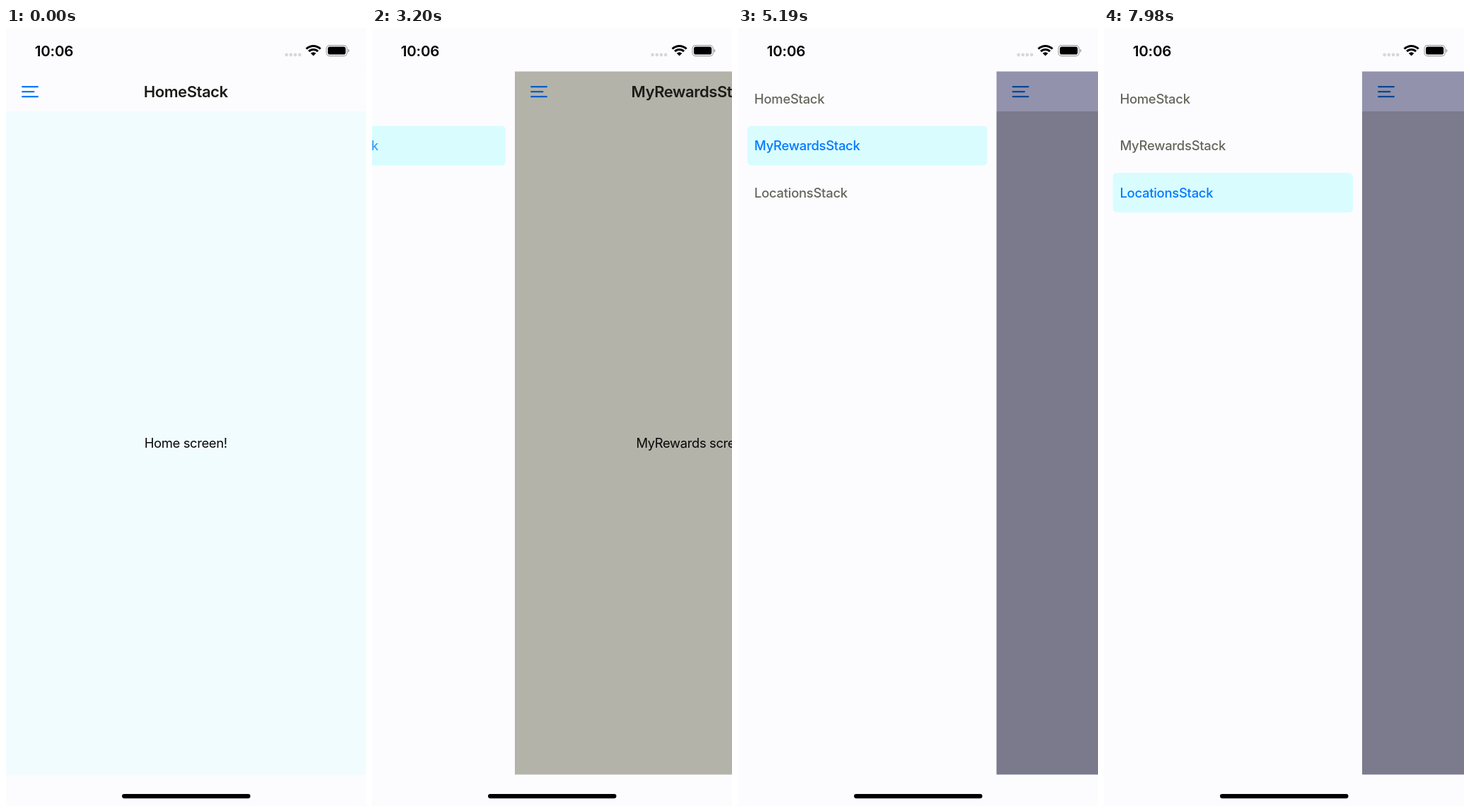
An HTML page with a canvas for the animation above (8 s loop, 509 px wide and 1101 px high).

```html
<!DOCTYPE html>
<html lang="en">
<head>
<meta charset="utf-8">
<title>Drawer navigation</title>
<style>
  html, body { margin: 0; width: 100%; height: 100%; overflow: hidden; background: #fcfcff; }
  canvas { display: block; }
</style>
</head>
<body>
<canvas id="stage" width="509" height="1101"></canvas>
<script>
const ctx = document.getElementById('stage').getContext('2d');
const LOOP = 8000, WIDTH = 509, DRAWER = 365.5;
const TOP = 61.5, HEADER_END = 118, BOTTOM = 1056.5;
const WHITE = '#fcfcff', BLUE = [0, 122, 255];
const ROUTES = ['Home', 'MyRewards', 'Locations'];

// Each move: press down, release, spring start, and whether the drawer ends open.
const MOVES = [
  { down: 1570, up: 1700, start: 1711, open: 1 },
  { down: 2790, up: 3090, start: 3118, open: 0, route: 1 },
  { down: 4275, up: 4420, start: 4432, open: 1 },
  { down: 5660, up: 5940, start: 5979, open: 0, route: 2 },
  { down: 7370, up: 7490, start: 7500, open: 1 },
];

// Shades of the dimmed screen by drawer progress.
const HEADER_SHADES = [[0, 252, 252, 255], [.077, 252, 252, 255], [.554, 179, 179, 170], [.94, 147, 146, 172], [1, 146, 146, 172]];
const BODY_SHADES = [[0, 243, 243, 254], [.077, 229, 229, 252], [.554, 179, 179, 170], [.94, 146, 145, 168], [1, 122, 122, 140]];

const rgb = c => `rgb(${c.map(Math.round).join()})`;

function shade(stops, p) {
  const i = Math.max(1, stops.findIndex(s => s[0] >= p));
  const [a, b] = [stops[i - 1], stops[i]];
  const k = (p - a[0]) / (b[0] - a[0]);
  return rgb([1, 2, 3].map(n => a[n] + (b[n] - a[n]) * k));
}

// Critically damped spring: stiffness 1000, mass 3.
function spring(ms) {
  const u = Math.sqrt(1000 / 3) / 1000 * Math.max(0, ms);
  return 1 - (1 + u) * Math.exp(-u);
}

function pressAlpha(t, { down, up }) {
  if (t < down) return 1;
  const k = Math.min(1, Math.max(0, (t - up) / 200));
  return .3 + .7 * (k < .5 ? 2 * k * k : 1 - 2 * (1 - k) ** 2);
}

function stateAt(t) {
  const state = { progress: 0, route: 0, buttonAlpha: 1, itemAlpha: [1, 1, 1] };
  for (const move of MOVES) {
    if (t < move.down) break;
    const alpha = pressAlpha(t, move);
    if (move.open) state.buttonAlpha = alpha;
    else state.itemAlpha[move.route] = alpha;
    if (!move.open && t >= move.up) state.route = move.route;
    if (t >= move.start) {
      const k = spring(t - move.start);
      state.progress = move.open ? k : 1 - k;
    }
  }
  return state;
}

function rect(x, y, w, h, color, r = 0) {
  ctx.fillStyle = color;
  ctx.beginPath();
  ctx.roundRect(x, y, w, h, r);
  ctx.fill();
}

function text(str, x, y, size, weight, color, spacing = 0, align = 'left') {
  ctx.font = `${weight} ${size}px Inter, sans-serif`;
  ctx.letterSpacing = spacing + 'px';
  ctx.textAlign = align;
  ctx.fillStyle = color;
  ctx.fillText(str, x, y);
}

function drawDrawer({ progress, route, itemAlpha }) {
  const x = (progress - 1) * DRAWER;
  ROUTES.forEach((name, i) => {
    const y = 72 + i * 66.5;
    if (i === route) rect(x + 13, y, 339.5, 56, '#d9fdff', 5.5);
    ctx.globalAlpha = itemAlpha[i];
    text(name + 'Stack', x + 23, y + 34.5, 18.4, 500, i === route ? rgb(BLUE) : '#66665c', -.25);
    ctx.globalAlpha = 1;
  });
}

function drawScreen({ progress, route, buttonAlpha }, t) {
  const x = progress * DRAWER, dim = 1 - .42 * progress;
  const body = t < MOVES[0].down ? '#f1fcff' : shade(BODY_SHADES, progress);
  rect(x, TOP, WIDTH, HEADER_END - TOP, shade(HEADER_SHADES, progress));
  rect(x, HEADER_END, WIDTH, BOTTOM - HEADER_END, body);

  ctx.globalAlpha = buttonAlpha;
  const blue = rgb(BLUE.map(c => c * dim));
  [24, 18.5, 24].forEach((w, i) => rect(x + 22, 82 + i * 7, w, 2.2, blue, 1.1));
  ctx.globalAlpha = 1;

  const center = x + WIDTH / 2 - .3;
  text(ROUTES[route] + 'Stack', center, 98, 22, 600, '#1c1c17', -.45, 'center');
  text(ROUTES[route] + ' screen!', center, 594, 18.4, 400, '#080808', -.36, 'center');
}

function drawWifi(x, y) {
  ctx.save();
  ctx.beginPath();
  ctx.moveTo(x, y);
  ctx.arc(x, y, 16, -Math.PI * .75, -Math.PI * .25);
  ctx.closePath();
  ctx.clip();
  ctx.strokeStyle = '#000';
  ctx.lineWidth = 3;
  for (const r of [14.2, 9.2]) {
    ctx.beginPath();
    ctx.arc(x, y, r, -Math.PI, 0);
    ctx.stroke();
  }
  ctx.fillStyle = '#000';
  ctx.beginPath();
  ctx.arc(x, y, 5.4, -Math.PI, 0);
  ctx.fill();
  ctx.restore();
}

function drawSystem() {
  text('10:06', 40.8, 40, 20.5, 600, '#000', -.2);
  for (let i = 0; i < 4; i++) rect(394.3 + i * 6.2, 35.6, 4.6, 4.6, '#d7d7da', 2.3);
  drawWifi(434.6, 39.6);
  ctx.strokeStyle = '#a3a3a6';
  ctx.lineWidth = 1.2;
  ctx.beginPath();
  ctx.roundRect(453, 24.6, 29.2, 15, 4.5);
  ctx.stroke();
  rect(455, 26.6, 25.2, 11, '#000', 2.8);
  rect(483.5, 29.8, 1.8, 4.8, '#a3a3a6', [0, 2, 2, 0]);
  rect(164, 1084, 181.5, 6.2, '#000', 3.1);
}

function draw() {
  const t = performance.now() % LOOP, state = stateAt(t);
  rect(0, 0, WIDTH, 1101, WHITE);
  drawDrawer(state);
  drawScreen(state, t);
  drawSystem();
  requestAnimationFrame(draw);
}
draw();
</script>
</body>
</html>
```
